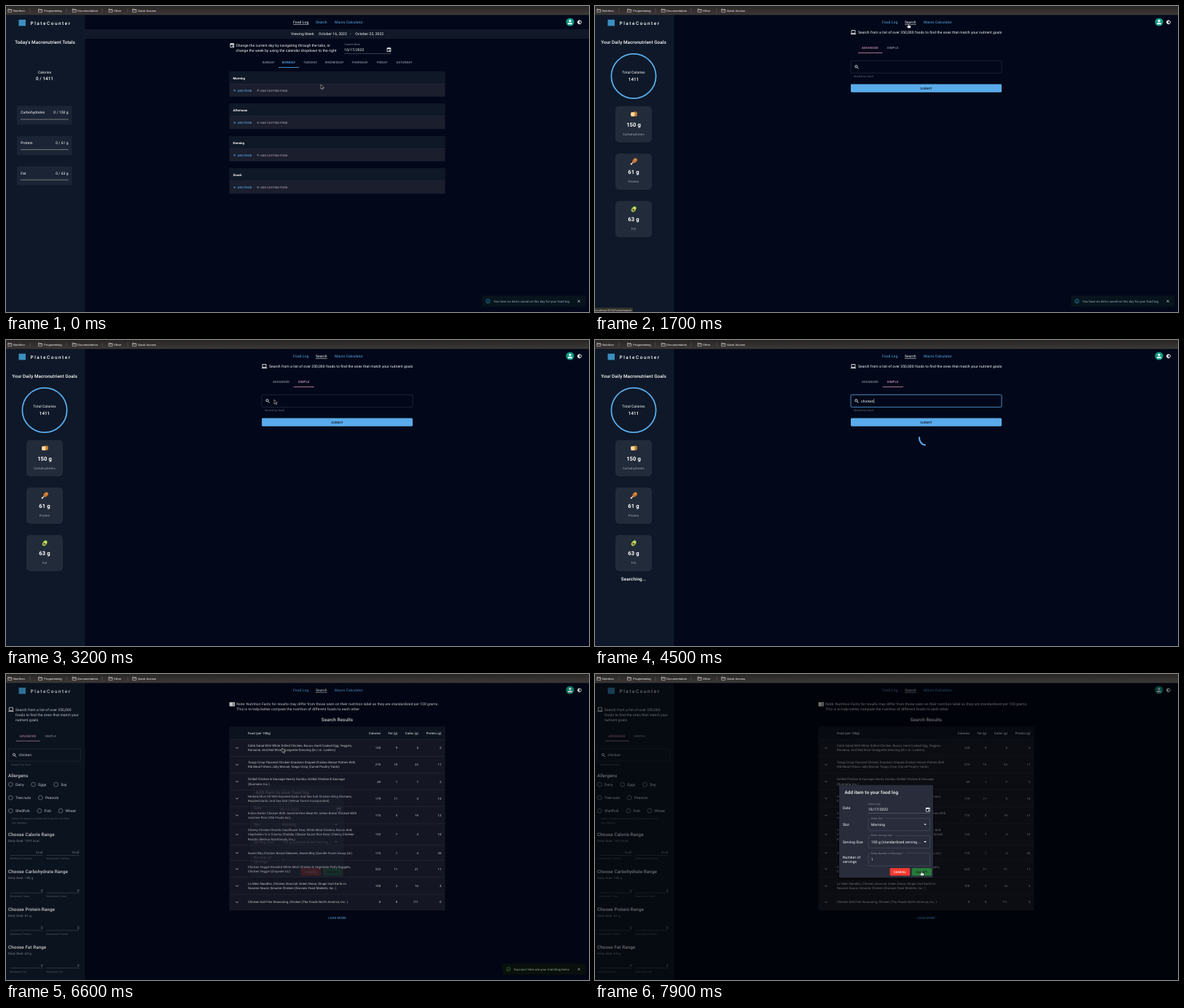
These frames come from a looping animation (800x421 px, 8000 ms). An HTML page:

```html
<!DOCTYPE html>
<html lang="en">
<head>
<meta charset="utf-8">
<title>Food log</title>
<style>
html, body { margin: 0; width: 100%; height: 100%; overflow: hidden; background: #020819; }
svg { display: block; width: 100%; height: 100%; font-family: Roboto, sans-serif; text-rendering: geometricPrecision; }
text { letter-spacing: .0107em; white-space: pre; }
.m { font-weight: 500; }
.b { font-weight: 700; }
.u { font-weight: 500; letter-spacing: .0286em; }
.s { letter-spacing: .0333em; }
.c { text-anchor: middle; }
.r { text-anchor: end; }
.i { font-family: Inter, sans-serif; letter-spacing: 0; }
.brand { font-weight: 500; letter-spacing: 1.55px; }
</style>
</head>
<body>
<svg id="stage" viewBox="0 0 800 421" preserveAspectRatio="none"></svg>
<script>
const LOOP = 8000;
const BLUE = '#5aabea', PINK = '#cf8fb8', GRAY = '#8b919c', DIM = '#6f7683', SIDE = '#0e1828';

// y is the middle of the capitals
const text = (x, y, size, str, cls = '', fill = '#fff', extra = '') =>
  `<text x="${x}" y="${(y + size * .355).toFixed(2)}" font-size="${size}" class="${cls}" fill="${fill}" ${extra}>${str.replace(/&/g, '&amp;')}</text>`;
const rect = (x, y, w, h, fill, rx = 0, extra = '') =>
  `<rect x="${x}" y="${y}" width="${w}" height="${h}" fill="${fill}" rx="${rx}" ${extra}/>`;
const circle = (x, y, r, fill, extra = '') => `<circle cx="${x}" cy="${y}" r="${r}" fill="${fill}" ${extra}/>`;
const path = (d, stroke, w = .7, fill = 'none', extra = '') =>
  `<path d="${d}" stroke="${stroke}" stroke-width="${w}" fill="${fill}" ${extra}/>`;
const group = (id, ...parts) => `<g id="${id}">${parts.join('')}</g>`;
const at = (x, y, ...parts) => `<g transform="translate(${x} ${y})">${parts.join('')}</g>`;

const folder = x => path(`M${x} 4h1.8l.7.8h2.6v3.6h-5.1zM${x} 5.5h5.1`, '#d8d5d2', .6);
const laptop = (x, y) => at(x, y, path('M1.2 .5h5v4.2h-5z', '#fff', .8), rect(0, 5.2, 7.4, .9, '#fff'));
const calendar = (x, y) => at(x, y,
  rect(-2.8, -2.6, 5.6, 5.6, '#fff', .6), rect(-2.1, -.9, 4.2, 3.2, '#101626'),
  rect(.2, .3, 1.4, 1.4, '#fff'), rect(-1.8, -3.2, .7, 1, '#fff'), rect(1.1, -3.2, .7, 1, '#fff'));
const lens = (x, y) => at(x, y, circle(-.6, -.6, 1.6, 'none', 'stroke="#fff" stroke-width=".8"'), path('M.6 .6L2.6 2.6', '#fff', .9));
const plus = (x, y, c) => path(`M${x - 1.6} ${y}h3.2M${x} ${y - 1.6}v3.2`, c, .6);

const browserBar = () => rect(0, 0, 800, 12.3, 'url(#bar)') +
  [[2.8, 10, 'Nutrition', 33], [44.5, 52.3, 'Programming', 83], [91.2, 98.3, 'Documentation', 132],
   [141, 148, 'Other', 167], [173.7, 181, 'Quick Access']].map(([fx, x, s, dots]) =>
    folder(fx) + text(x, 6.2, 3.8, s, 'i m', '#e4e2e0') +
    (dots ? [4.3, 6.2, 8.1].map(y => circle(dots, y, .45, '#aaa6a3')).join('') : '')).join('');

const header = () =>
  text(394, 22.3, 5, 'Food Log', '', BLUE, 'id="navLog"') + text(425, 22.3, 5, 'Search', '', BLUE, 'id="navSearch"') +
  text(451, 22.3, 5, 'Macro Calculator', '', BLUE) +
  circle(774, 22, 5.6, '#0d9a86') + circle(774, 20.4, 1.7, '#fff') + path('M770.9 25.2q0-2.4 3.1-2.4t3.1 2.4z', 'none', 0, '#fff') +
  rect(784.6, 19.9, 4.6, 4.6, '#fff', .4) + rect(784.6, 19.9, 4.6, 4.6, '#fff', .4, 'transform="rotate(45 786.9 22.2)"') +
  path('M786.9 20.3a1.9 1.9 0 0 1 0 3.8z', 'none', 0, '#020819');

const sidebar = () => rect(0, 12.3, 108, 409, SIDE) + rect(107.6, 12.3, .5, 409, '#1b2536') +
  rect(17.5, 18.8, 9.5, 8.6, '#3b8fbf') + text(33.5, 23.3, 6.4, 'PlateCounter', 'brand');

const logSide = () => text(53.5, 50, 6.3, "Today's Macronutrient Totals", 'm c') +
  text(53, 91.5, 5, 'Calories', 'c') + text(53, 100.2, 6.3, '0 / 1411', 'm c') +
  [['Carbohydrates', 150], ['Protein', 61], ['Fat', 63]].map(([s, n], i) => at(0, i * 41.6,
    rect(15, 137.3, 75.5, 26, '#1a2435', 1), text(20.3, 146.7, 5, s), text(85.6, 146.7, 5, `0 / ${n} g`, 'r'),
    rect(20, 155.5, 65.5, 1, '#77777a'))).join('');

const logMain = () => rect(108, 32, 692, 13, '#111827') +
  text(391, 38.7, 4.95, 'Viewing Week:') + text(429, 38.7, 5, 'October 16, 2022') + text(472.3, 38.7, 5, '-') + text(479.3, 38.7, 5, 'October 22, 2022') +
  calendar(310.3, 54.2) + text(315.5, 54, 5, 'Change the current day by navigating through the tabs, or') +
  text(315.5, 61.5, 5, 'change the week by using the calendar dropdown to the right') +
  text(464.3, 52.3, 3.75, 'Current Date', '', GRAY) + text(464.3, 60, 5, '10/17/2022') + calendar(525.5, 60) + rect(464, 65, 64.5, .4, '#8a8f99') +
  [['SUNDAY', 360], ['MONDAY', 388], ['TUESDAY', 417.5], ['WEDNESDAY', 450.6], ['THURSDAY', 485.5], ['FRIDAY', 516.2], ['SATURDAY', 546.6]]
    .map(([s, x], i) => text(x, 77.7, 4.29, s, 'u c', i == 1 ? BLUE : GRAY)).join('') + rect(374, 84.1, 28.3, .8, BLUE) +
  ['Morning', 'Afternoon', 'Evening', 'Snack'].map((s, i) => at(0, i * 44.5,
    rect(306.5, 90, 296, 34.7, '#1a1e2d', 1), rect(306.5, 90, 296, 17, '#0f1827', 1), rect(306.5, 107, 296, .4, '#2b3140'),
    text(311.5, 99.1, 4.29, s, 'b'), plus(313.7, 116.1, BLUE), text(317.8, 116.2, 3.88, 'ADD FOOD', 'u', BLUE),
    plus(345.8, 116.1, '#a598a8'), text(349, 116.2, 3.93, 'ADD CUSTOM FOOD', 'u', '#a598a8'))).join('');

const foods = [
  at(53.3, 148.5, rect(-1.5, -3, 6, 6.2, '#c77f35', 1.6), rect(-4.3, -2.6, 5.6, 6, '#f0c27b', 1.6), rect(-3.6, -1.6, 4.2, 4.3, '#f8dda6', 1)),
  at(53.3, 213.8, path('M-3.6 3.8L0 0', '#f2e3c8', 1.3), circle(-3.6, 3.6, 1.1, '#f2e3c8'),
    '<ellipse cx="1.4" cy="-1.2" rx="3.6" ry="2.7" fill="#c9762f" transform="rotate(-45 1.4 -1.2)"/>', circle(2.2, -2.4, 1.1, '#e39a4b')),
  at(53.2, 279.5, '<g transform="rotate(35)"><ellipse rx="3.1" ry="4.6" fill="#4d8a2c"/><ellipse rx="2.3" ry="3.8" fill="#c9dc6a"/></g>', circle(-.5, 1, 1.4, '#7b4a25'))
];
const goalSide = () => text(53, 50, 6.3, 'Your Daily Macronutrient Goals', 'm c') +
  circle(53, 96.5, 30.6, 'none', `stroke="${BLUE}" stroke-width="1.8"`) +
  text(53, 91.6, 5, 'Total Calories', 'c') + text(53, 100.4, 6.2, '1411', 'm c') +
  [['150 g', 'Carbohydrates'], ['61 g', 'Protein'], ['63 g', 'Fat']].map(([n, s], i) => at(0, i * 65.2,
    rect(28, 138.6, 50, 50, '#08101c', 5, 'opacity=".6"'), rect(28, 137.8, 50, 50, '#222b3a', 5),
    text(53, 163.2, 7.6, n, 'b c'), text(53, 176.5, 4.29, s, 's c', '#a5abb5'))).join('') + foods.join('') +
  text(53, 328.3, 6.3, 'Searching...', 'm c', '#fff', 'id="searching"');

const searchMain = () => laptop(350.8, 33) +
  text(361, 36.2, 5, 'Search from a list of over 350,000 foods to find the ones that match your nutrient goals') +
  text(377.5, 57.6, 4.29, 'ADVANCED', 'u c', GRAY, 'id="tabAdv"') + text(408.6, 57.6, 4.29, 'SIMPLE', 'u c', GRAY, 'id="tabSimple"') +
  circle(405, 57, 0, '#c9a5c0', 'id="ripple"') + rect(361, 64.1, 33.5, .8, PINK, 0, 'id="mark"') +
  rect(351, 75.3, 207, 17, 'none', 1.4, 'id="field"') + lens(359, 83.8) +
  text(365, 84, 5, '', '', '#fff', 'id="typed"') + rect(0, 80.8, .45, 6.2, '#fff', 0, 'id="caret"') +
  text(355, 96.6, 3.75, 'Search by food', 's', DIM) +
  rect(351, 107.5, 207, 11.2, BLUE, 1.4) + text(454.5, 113.2, 4.29, 'SUBMIT', 'u c', '#0c1a2a') +
  path('', BLUE, 2, 'none', 'id="spinner"');

const radios = [['Dairy', 6.4, 152], ['Eggs', 37.6, 152], ['Soy', 68.6, 152], ['Tree nuts', 6.4, 170.2], ['Peanuts', 47.3, 170.2],
  ['Shellfish', 6.4, 188.2], ['Fish', 45.9, 188.2], ['Wheat', 75, 188.2]];
const filterSide = () => laptop(3.2, 45.6) +
  ['Search from a list of over 350,000', 'foods to find the ones that match your', 'nutrient goals'].map((s, i) => text(13, 49 + i * 7.3, 5, s)).join('') +
  text(30, 85.2, 4.29, 'ADVANCED', 'u c', PINK) + text(61.2, 85.2, 4.29, 'SIMPLE', 'u c', GRAY) + rect(13.5, 91.7, 33.3, .8, PINK) +
  rect(3.2, 103, 99, 17, 'none', 1.4, 'stroke="#3b4453" stroke-width=".5"') + lens(11.6, 111.6) + text(17.5, 111.7, 5, 'chicken') +
  text(7.2, 124.6, 3.75, 'Search by food', 's', DIM) + text(3, 140.2, 6.3, 'Allergens', 'm') +
  radios.map(([s, x, y]) => circle(x, y, 2.9, 'none', 'stroke="#b9bec6" stroke-width=".6"') + text(x + 6.6, y, 5, s)).join('') +
  text(7.7, 198.5, 3.57, 'Leave all options unselected if you do not have', 's', DIM) + text(7.7, 205, 3.57, 'any allergies', 's', DIM) +
  [['Calorie', '1411 kcal', 'Calories', 'kcal'], ['Carbohydrate', '150 g', 'Carbs', 'g'], ['Protein', '61 g', 'Protein', 'g'], ['Fat', '63 g', 'Fat', 'g']]
    .map(([name, goal, short, unit], i) => at(0, i * 51.8,
      text(3, 220.4, 6.3, `Choose ${name} Range`, 'm'), text(3, 229, 4.29, `Daily Goal: ${goal}`, 's', '#a9afb9'),
      ...[['Minimum', 5.5], ['Maximum', 55.5]].map(([lim, x]) => text(x + 45, 245, 5, unit, 'r', GRAY) +
        rect(x, 249.1, 45, .4, '#727a86') + text(x, 254, 3.57, `${lim} ${short}`, 's', DIM)))).join('');

// height, values, name lines
const rows = [
  [23.2, '120 9 5 5', 'Cobb Salad With White Grilled Chicken, Bacon, Hard Cooked Egg, Veggies,', 'Romaine, And Red Wine Vinaigrette Dressing (B.r.i.m. Larders)'],
  [23.2, '275 15 22 11', 'Tango Crisp Flavored Chicken Snackers Shaped Chicken Breast Patties With', 'Rib Meat Fritters Jolly Morsel, Tango Crisp (Corvel Poultry Yards)'],
  [23.2, '49 1 7 2', 'Grilled Chicken & Sausage Hearty Gumbo, Grilled Chicken & Sausage', '(Dunmere, Inc.)'],
  [23.2, '179 11 3 15', 'Herbed Olive Oil With Roasted Garlic And Sea Salt Chicken Wing Sections,', 'Roasted Garlic And Sea Salt (Velmar Farms Incorporated)'],
  [23.2, '173 5 19 12', 'Indian Butter Chicken With Jasmine Rice Meal Kit, Indian Butter Chicken With', 'Jasmine Rice (Ubb Foods Inc)'],
  [29.6, '122 7 4 10', 'Cheesy Chicken Risotto Cauliflower Rice, White Meat Chicken, Bacon And', 'Vegetables In A Creamy Cheddar Cheese Sauce Rice Bowl, Cheesy Chicken', 'Risotto (Belmor Nutritionals, Inc.)'],
  [21, '115 1 4 20', 'Sweet Bbq Chicken Breast Skewers, Sweet Bbq (Quindle Foods Group Llc)'],
  [23.2, '222 11 21 11', 'Chicken Veggie Breaded White Meat Chicken & Vegetable Patty Nuggets,', 'Chicken Veggie (Cropvale Llc)'],
  [23.3, '100 2 16 4', 'Lo Mein Noodles, Chicken, Broccoli, Green Onion, Ginger And Garlic In', 'Sesame Sauce, Sesame Chicken (Dorvans Food Markets, Inc. )'],
  [21.5, '0 0 111 0', 'Chicken Salt Free Seasoning, Chicken (T&v Foods North America, Inc. )']
];
const cols = [514.2, 537.3, 566, 597.5];
function results() {
  let top = 90;
  const body = rows.map(([h, nums, ...lines]) => {
    const y = top + h / 2;
    top += h;
    return rect(306.5, top - .2, 296, .4, '#3c414e') + path(`M315.3 ${y - .8}l1.7 1.7l1.7-1.7`, '#fff', .8) +
      lines.map((s, i) => text(332, y + (i - (lines.length - 1) / 2) * 6.25, 4.29, s)).join('') +
      nums.split(' ').map((n, i) => text(cols[i], y, 4.29, n, 'r')).join('');
  }).join('');
  return path('M306.8 39h2.8q.7 0 .7.6q0-.6.7-.6h2.8v5.2h-7z', '#fff', .4, '#fff') +
    path('M310.7 40.6h2.2M310.7 41.8h2.2M310.7 43h2.2', '#020819', .5) +
    text(316.3, 41.4, 5, 'Note: Nutrition Facts for results may differ from those seen on their nutrition label as they are standardized per 100 grams.') +
    text(316.3, 48.6, 5, 'This is to help better compare the nutrition of different foods to each other.') +
    text(454.5, 62.6, 6.35, 'Search Results', 'm c') +
    rect(306.5, 72.5, 296, top - 72.5, '#1a1e2d', 1) + rect(306.5, 72.5, 296, 17.5, '#101827', 1) + rect(306.5, 89.8, 296, .4, '#3c414e') +
    text(332, 81.4, 4.29, 'Food (per 100g)', 'm') +
    ['Calories', 'Fat (g)', 'Carbs (g)', 'Protein (g)'].map((s, i) => text(cols[i], 81.4, 4.29, s, 'm r')).join('') +
    body + text(454.5, 335.5, 4.29, 'LOAD MORE', 'u c', BLUE);
}

const snack = (id, x, str, bg, fg, icon, mark) => group(id,
  rect(x, 398.6, 795.5 - x, 15, bg, 1.4), circle(x + 8.2, 406.1, 2.7, 'none', `stroke="${icon}" stroke-width=".6"`),
  path(mark, icon, .7, 'none', `transform="translate(${x + 8.2} 406.1)"`),
  text(x + 15.8, 406.3, 4.29, str, '', fg), path('M784.6 404.7l3 3m0-3l-3 3', '#dfeaf0', .7));

const outlined = (y, h, label, value, arrow) => rect(375.2, y, 84.3, h, 'none', 1.4, 'stroke="#5a6070" stroke-width=".45"') +
  rect(378, y - 1, label.length * 1.78 + 2, 2, '#282c3b') + text(379, y - .2, 3.6, label, '', GRAY) +
  text(379, y + h / 2 + .2, 5, value) + (arrow ? path(`M451.2 ${y + h / 2 - .8}h3.6l-1.8 1.8z`, 'none', 0, '#fff') : '');
const dialog = () => rect(333.5, 154, 132, 129, '#000', 3, 'opacity=".35"') + rect(335, 152.7, 129, 127.5, '#282c3b', 1.4) +
  text(342.5, 163.2, 6.35, 'Add item to your food log', 'm') +
  text(340, 184.2, 5, 'Date') + text(340, 207.2, 5, 'Slot') + text(340, 231.2, 5, 'Serving Size') + text(340, 252, 5, 'Number of') + text(340, 258.6, 5, 'servings') +
  text(375, 178.8, 3.6, 'Select day', '', GRAY) + text(375, 186.6, 5, '10/17/2022') + rect(375, 191.4, 84.5, .4, '#8a8f99') + calendar(456.7, 186.6) +
  outlined(198.6, 17, 'Enter Slot', 'Morning', 1) + outlined(222.4, 17, 'Enter serving size', '100 g (standardized serving ...', 1) +
  outlined(246.6, 17.4, 'Enter Number of Servings *', '1') +
  rect(404.7, 267, 27.4, 10.6, '#f13a30', 1.4) + text(418.4, 272.4, 4.29, 'CANCEL', 'u c') +
  rect(434.7, 267, 27.3, 10.6, '#2f8f45', 1.4, 'id="ok"') + text(448.4, 272.4, 4.29, 'SUBMIT', 'u c', '#0d2614');

const stage = document.getElementById('stage');
stage.innerHTML = `<defs><linearGradient id="bar" x2="0" y2="1"><stop stop-color="#282525"/><stop offset="1" stop-color="#3b3837"/></linearGradient></defs>` +
  rect(0, 0, 800, 421, '#020819') + header() +
  group('side', sidebar()) + group('log', logSide(), logMain()) + group('search', goalSide(), searchMain()) + group('found', filterSide(), results()) +
  snack('info', 653.2, 'You have no items saved on this day for your food log.', '#07141b', '#8fb9ca', '#29a9e0', 'M0-1.4v.6M0-.2v1.7') +
  snack('success', 681.3, 'Success! Here are your matching items', '#0c140f', '#bcd8be', '#58a85c', 'M-1.2 0l.9 1l1.7-1.9') +
  rect(0, 12.3, 800, 409, '#000', 0, 'id="shade"') + group('dialog', dialog()) +
  group('link', rect(0, 415, 52, 6, '#34332f', 1), text(.2, 418.2, 3.7, 'localhost:3000/home/search', 'i', '#e2e0dc')) +
  group('pointer',
    path('M0 0v6.2l1.5-1.4l1 2.2l.9-.4l-1-2.1h2z', '#e8e8e8', .5, '#000', 'id="arrow"'),
    path('M-.6 .4q.6-.8 1.2 0v2.2l2.4.6q.6.3.5 1l-.5 2.3h-3.4l-2-2.4q-.2-.8.6-.7l1.2.8z', '#000', .4, '#fff', 'id="hand"')) +
  browserBar();

const el = {};
stage.querySelectorAll('[id]').forEach(n => el[n.id] = n);
const set = (id, attrs) => { for (const k in attrs) el[id].setAttribute(k, attrs[k]); };
const show = (id, on) => set(id, { display: on ? 'inline' : 'none' });
const ease = (t, from, to) => { const p = Math.min(1, Math.max(0, (t - from) / (to - from))); return p * p * (3 - 2 * p); };
const within = (t, a, b) => t >= a && t < b;

// time, x, y of the pointer tip
const route = [[0, 432, 108], [150, 432, 108], [750, 430, 24], [1850, 430, 24], [2000, 421, 40], [2180, 421, 40], [2290, 404, 55],
  [2500, 404, 55], [3000, 411, 138], [3100, 411, 138], [3200, 368, 82], [5600, 368, 82], [6200, 379, 102], [6600, 379, 102], [7400, 448, 271], [LOOP, 448, 271]];

function movePointer(t) {
  const i = route.findIndex(k => k[0] > t), [ta, xa, ya] = route[i - 1], [tb, xb, yb] = route[i];
  const p = ease(t, ta, tb), hand = within(t, 700, 1900) || within(t, 2250, 2620) || t > 7350;
  set('pointer', { transform: `translate(${xa + (xb - xa) * p} ${ya + (yb - ya) * p})` });
  show('pointer', !within(t, 3700, 5600));
  show('hand', hand);
  show('arrow', !hand);
}

function popup(id, t, from, to) {
  const p = ease(t, from, from + 225), gone = ease(t, to, to + 195), k = .86 + .14 * p;
  set(id, { opacity: p * (1 - gone), transform: `translate(738 406) scale(${k}) translate(-738 -406)` });
  show(id, t > from && gone < 1);
}

function draw(t) {
  const loaded = t >= 1300, found = t >= 5400, simple = t >= 2250, busy = within(t, 4400, 5400);
  show('log', t < 1000);
  show('side', t < 1000 || loaded);
  show('search', loaded && !found);
  show('found', found);
  for (const [id, on] of [['navLog', t < 1000], ['navSearch', t >= 1000]])
    set(id, { fill: on ? '#fff' : BLUE, 'text-decoration': on ? 'underline' : 'none' });
  show('link', within(t, 780, 1950));

  set('tabAdv', { fill: simple ? GRAY : PINK });
  set('tabSimple', { fill: simple ? PINK : GRAY });
  const slide = ease(t, 2270, 2570);
  set('mark', { x: 361 + 33.7 * slide, width: 33.5 - 5.3 * slide });
  show('ripple', within(t, 2240, 2790));
  set('ripple', { r: Math.max(0, 3 + (t - 2240) / 45), opacity: .3 * (1 - ease(t, 2300, 2790)) });

  const focus = t >= 3550;
  set('field', { stroke: focus ? BLUE : '#3d4351', 'stroke-width': focus ? .8 : .45 });
  el.typed.textContent = 'chicken'.slice(0, Math.max(0, Math.floor((t - 3610) / 95)));
  set('caret', { x: 365.2 + el.typed.getComputedTextLength() });
  show('caret', focus && (t < 4300 || (t - 4300) % 1060 < 530));

  show('searching', busy);
  show('spinner', busy);
  const u = (t - 4500) / 1400, start = 1.66 + u * Math.PI * 2, arc = 1.65 + 1.3 * Math.sin(u * Math.PI * 2);
  const spot = a => `${454.6 + 9.6 * Math.cos(a)} ${135 + 9.6 * Math.sin(a)}`;
  set('spinner', { d: `M${spot(start)}A9.6 9.6 0 0 1 ${spot(start + arc)}` });

  popup('info', t < 1000 ? t + LOOP : t, t < 1000 ? 0 : 1450, t < 1000 ? 2 * LOOP : 2750);
  popup('success', t, 5450, 7150);

  const open = ease(t, 6540, 6765);
  show('dialog', open > 0);
  set('dialog', { opacity: open });
  set('shade', { opacity: .57 * ease(t, 6480, 6765) });
  set('ok', { fill: t > 7350 ? '#277a3a' : '#2f8f45' });
  movePointer(t);
}

function tick() {
  draw(performance.now() % LOOP);
  requestAnimationFrame(tick);
}
tick();
</script>
</body>
</html>
```
